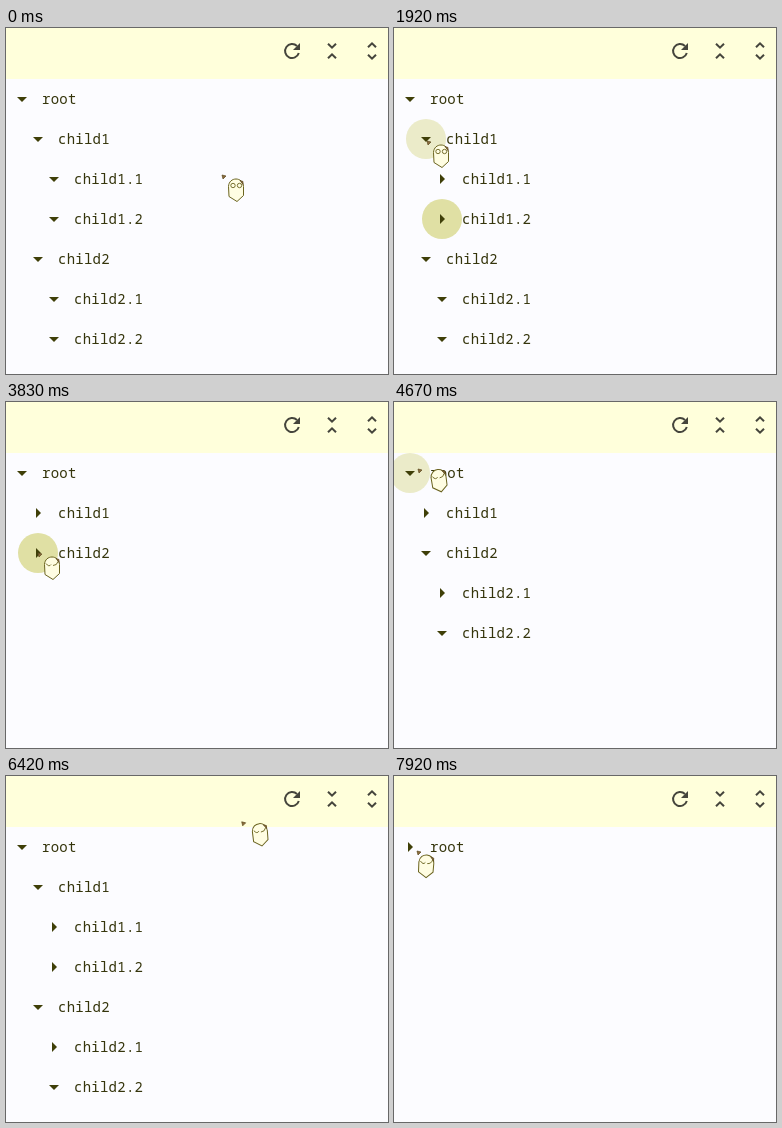
Recreate the animation shown at these times as an HTML page. Size 382 by 346 pixels, loop 8000 ms.

```html
<!DOCTYPE html>
<html>
<head>
<meta charset="utf-8">
<style>
html, body { margin: 0; height: 100%; overflow: hidden; background: #fcfcff; }
svg { display: block; width: 100vw; height: 100vh; }
text { font: 14px "Noto Sans Mono", "DejaVu Sans Mono", monospace; letter-spacing: .25px; fill: #35350c; }
.arrow { fill: #3f3f08; }
.tool { fill: none; stroke: #45453c; stroke-width: 2; }
.solid { fill: #45453c; stroke: none; }
#halos { fill: #b8b828; }
#pet { fill: #fffde2; stroke: #6b6420; }
.paw { fill: #8c6c3c; stroke: #5c4a20; stroke-width: .7; }
#pet .line { fill: none; stroke-width: .9; }
</style>
</head>
<body>
<svg viewBox="0 0 382 346">
  <rect width="382" height="346" fill="#fcfcff"/>
  <rect width="382" height="51" fill="#ffffdb"/>
  <g id="halos"></g>
  <g class="tool">
    <g transform="translate(286 23)">
      <path d="M5 -5A7 7 0 1 0 6.8 2"/>
      <path class="solid" d="M8 -8v7h-7z"/>
    </g>
    <path transform="translate(326 23)" d="M-4 -7.3l4 4 4-4M-4 7.3l4-4 4 4"/>
    <path transform="translate(366 23)" d="M-4 -3.7l4-4 4 4M-4 3.7l4 4 4-4"/>
  </g>
  <g id="tree"></g>
  <g id="pet">
    <path id="tip" class="paw" d="M-2 -2L2 -1 -1 2z"/>
    <g id="body">
      <path d="M-7.5 -4C-7 -14 7 -14 7.5 -4V5L1 11 -7 6z"/>
      <path class="paw" d="M4 -10l3 1v3z"/>
      <g id="open"><circle class="line" cx="-3" cy="-5" r="2.2"/><circle class="line" cx="3.5" cy="-5" r="2.2"/></g>
      <path id="shut" class="line" d="M-6 -5q3 4 5 1M1 -3q4 0 5 -4"/>
    </g>
  </g>
</svg>
<script>
const NS = 'http://www.w3.org/2000/svg', LOOP = 8000, FPS = 12;
const $ = id => document.getElementById(id);
const add = (parent, tag, attrs) => {
  const el = parent.appendChild(document.createElementNS(NS, tag));
  for (const key in attrs) el.setAttribute(key, attrs[key]);
  return el;
};
const clamp = v => Math.max(0, Math.min(1, v));

// Builds one tree row; toggles are the steps at which it opens or closes.
function node(label, depth, ...toggles) {
  const g = add($('tree'), 'g');
  const arrow = add(g, 'path', { class: 'arrow' });
  add(g, 'text', { x: 36 + depth * 16, y: 5 }).textContent = label;
  return { g, arrow, depth, toggles };
}
const nodes = [
  node('root', 0, 61, 66, 88),
  node('child1', 1, 26, 72),
  node('child1.1', 2, 9),
  node('child1.2', 2, 19),
  node('child2', 1, 45, 49),
  node('child2.1', 2, 38),
  node('child2.2', 2)
];

const halos = [];
function halo(cx, cy, hover, press, leave) {
  halos.push({ el: add($('halos'), 'circle', { cx, cy, r: 20 }), hover, press, leave });
}
const rowHalo = (depth, row, ...steps) => halo(16 + depth * 16, 71 + row * 40, ...steps);
rowHalo(2, 2, 4, 8, 15);
rowHalo(2, 3, 13, 18, 24);
rowHalo(1, 1, 21, 25, 30);
rowHalo(2, 3, 33, 38, 43);
rowHalo(1, 2, 42, 44, 53);
rowHalo(0, 0, 53, 60, 71);
rowHalo(1, 1, 69, 71, 75);
halo(286, 23, 77, 99, 80);
halo(326, 23, 80, 85, 90);

// Pointer stops: arrival step, departure step, x, y, body offset
const stops = [];
const stop = (from, to, x, y, sway = 12) => stops.push({ from, to, x, y, sway });
stop(0, 0, 218, 149);
stop(3, 3, 125, 160);
stop(6, 8, 47, 155);
stop(12, 12, 52, 167, 18);
stop(15, 19, 49, 185, 8);
stop(23, 28, 35, 115);
stop(35, 39, 49, 191, 4);
stop(44, 51, 34, 153);
stop(56, 56, 26, 69, 19);
stop(58, 66, 19, 72, 16);
stop(69, 69, 26, 126, 19);
stop(71, 73, 34, 113);
stop(79, 79, 309, 25, 18);
stop(82, 82, 330, 28, 18);
stop(84, 89, 326, 16, 8);
stop(95, 96, 25, 77, 7);

function pose(step) {
  const i = stops.findLastIndex(s => s.from <= step);
  const a = stops[i], b = stops[i + 1] || a;
  const u = step <= a.to ? 0 : (step - a.to) / (b.from - a.to);
  const mix = key => a[key] + (b[key] - a[key]) * u * u * (3 - 2 * u);
  return { x: mix('x'), y: mix('y'), sway: mix('sway') };
}

function drawTree(step) {
  let y = 71, maxDepth = Infinity;
  for (const { g, arrow, depth, toggles } of nodes) {
    const shown = depth <= maxDepth;
    g.style.display = shown ? '' : 'none';
    if (!shown) continue;
    const closed = toggles.filter(s => s <= step).length % 2;
    maxDepth = closed ? depth : Infinity;
    const x = 16 + depth * 16;
    arrow.setAttribute('d', closed ? `M${x - 2} -5l5 5-5 5z` : `M${x - 5} -2h10l-5 5z`);
    g.setAttribute('transform', `translate(0 ${y})`);
    y += 40;
  }
}

function draw(now) {
  const step = Math.floor((now % LOOP) * FPS / 1000 + .1) % 96;
  drawTree(step);
  for (const { el, hover, press, leave } of halos) {
    const level = .25 * clamp((step - hover) / 2) + .17 * clamp((step - press) / 2);
    el.setAttribute('opacity', level * clamp((leave + 2 - step) / 2));
  }
  const { x, y, sway } = pose(step);
  const drop = 13.5 - Math.max(0, sway - 12) / 2;
  $('tip').setAttribute('transform', `translate(${x} ${y})`);
  $('body').setAttribute('transform', `translate(${x + sway} ${y + drop}) rotate(${12 - sway})`);
  const awake = step < 30;
  $('open').style.display = awake ? '' : 'none';
  $('shut').style.display = awake ? 'none' : '';
}

const start = performance.now();
function tick() {
  draw(performance.now() - start);
  requestAnimationFrame(tick);
}
tick();
</script>
</body>
</html>
```
